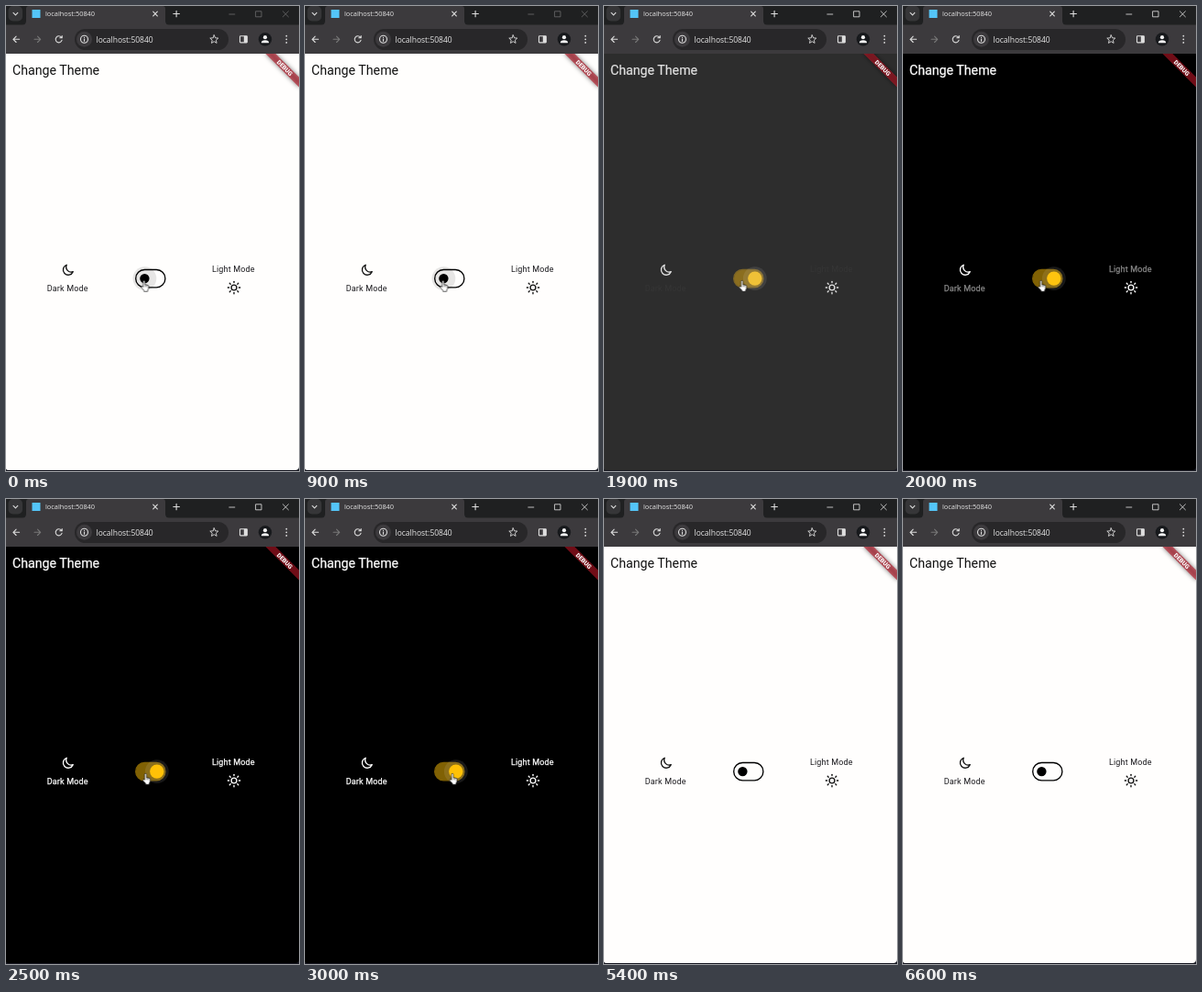
An HTML page for the animation above (6.8 s loop, 320 by 507 pixels).

```html
<!DOCTYPE html>
<html lang="en">
<head>
<meta charset="utf-8">
<title>Change Theme</title>
<style>
  html, body { margin: 0; width: 100%; height: 100%; overflow: hidden; background: #15161f; }

  svg { display: block; width: 100%; height: 100%; animation: theme 6.8s step-end infinite; }

  /* Every colour and the switch state step together */
  @keyframes theme {
    0% {
      --bg: #fffefd; --ink: #111; --label: #1c1b1f; --control: #6c6c6e; --bold: 0px;
      --track: #fffefd; --rim: #000; --thumb: #000; --thumb-x: 151.4px; --thumb-r: 5.2px;
      --halo: #00000018;
    }
    27.94% {
      --bg: #2d2d2d; --ink: #e2e2e2; --label: #353535; --control: #e8e8e8; --bold: .2px;
      --track: #8b6e1f; --rim: #7d6526; --thumb: #efc137; --thumb-x: 164.8px; --thumb-r: 7.7px;
      --halo: #ffffff18;
    }
    29.41% {
      --bg: #000; --ink: #fff; --label: #898989; --control: #e8e8e8; --bold: .25px;
      --track: #806104; --rim: #806104; --thumb: #ffc40f; --thumb-x: 164.8px; --thumb-r: 7.7px;
      --halo: #ffffff18;
    }
    30.88% {
      --bg: #000; --ink: #fff; --label: #d2d2d2; --control: #e8e8e8; --bold: .25px;
      --track: #806104; --rim: #806104; --thumb: #ffc40f; --thumb-x: 164.8px; --thumb-r: 7.7px;
      --halo: #ffffff18;
    }
    32.35% {
      --bg: #000; --ink: #fff; --label: #fff; --control: #e8e8e8; --bold: .25px;
      --track: #806104; --rim: #806104; --thumb: #ffc107; --thumb-x: 164.8px; --thumb-r: 7.7px;
      --halo: #ffffff18;
    }
    64.7% {
      --bg: #fffefd; --ink: #111; --label: #1c1b1f; --control: #e8e8e8; --bold: 0px;
      --track: #fffefd; --rim: #000; --thumb: #000; --thumb-x: 151.4px; --thumb-r: 5.2px;
      --halo: #00000018;
    }
    69.11%, 100% {
      --bg: #fffefd; --ink: #111; --label: #1c1b1f; --control: #e8e8e8; --bold: 0px;
      --track: #fffefd; --rim: #000; --thumb: #000; --thumb-x: 151.4px; --thumb-r: 5.2px;
      --halo: transparent;
    }
  }

  .pointer { animation: move 6.8s step-end infinite; }
  @keyframes move {
    0% { transform: translate(147.5px, 299px); opacity: 1; }
    36.76% { transform: translate(149.2px, 299px); opacity: 1; animation-timing-function: steps(5, end); }
    44.11% { transform: translate(157.7px, 299px); opacity: 1; }
    69.11%, 100% { transform: translate(157.7px, 299px); opacity: 0; }
  }

  .line { fill: none; stroke-linecap: round; stroke-linejoin: round; }
  .toolbar { fill: #3c3a3d; }
  .bar { stroke: #dedede; stroke-width: 1.1; }
  .disabled { stroke: #777; }
  .controls { stroke: var(--control); stroke-width: .8; }
  .icon { stroke: var(--ink); stroke-width: 1.35; }
  .page { fill: var(--bg); }
  .address { font-family: "Open Sans", "Noto Sans", sans-serif; fill: #e6e6e6; }
  .title { font: 14.2px Roboto, sans-serif; fill: var(--ink); stroke: var(--ink); stroke-width: var(--bold); }
  .label {
    font: 9.03px Roboto, sans-serif; letter-spacing: .16px;
    fill: var(--label); stroke: var(--label); stroke-width: var(--bold);
  }
  .debug { font: 900 6.6px Roboto, sans-serif; fill: #fff; text-anchor: middle; }
  .ribbon-shadow { fill: #0000007f; filter: blur(2.4px); }
  .ribbon { fill: #b31626a0; }
  .halo { cx: var(--thumb-x); fill: var(--halo); }
  .track { fill: var(--track); stroke: var(--rim); stroke-width: 1.35; }
  .thumb { cx: var(--thumb-x); r: var(--thumb-r); fill: var(--thumb); }
</style>
</head>
<body>
<svg viewBox="0 0 320 507">
  <defs>
    <clipPath id="content"><path d="M0 52H320V507H0z"/></clipPath>
    <path id="ray" d="M0 -5.4V-6.7"/>
  </defs>

  <!-- Browser tab strip -->
  <rect width="320" height="52" fill="#1f2021"/>
  <rect x="2.5" y="0" width="15.5" height="16.5" rx="5" fill="#363638"/>
  <path class="toolbar" d="M17 21q5 0 5-5V3q0-3 3-3H171q3 0 3 3V16q0 5 5 5z"/>
  <rect x="28.5" y="4" width="9" height="9" fill="#54c5f8"/>
  <text class="address" x="43" y="11.3" font-size="7.4">localhost:50840</text>
  <g class="line bar">
    <path d="M8 7.4l2.4 2.4 2.4-2.4M160.7 6.2l4.6 4.6m0-4.6l-4.6 4.6M182.8 8.5h6.6m-3.3-3.3v6.6"/>
  </g>
  <g class="line controls">
    <path d="M243.8 9h6M273 5.8h6v6h-6zM302.4 5.8l6 6m0-6l-6 6"/>
  </g>

  <!-- Toolbar -->
  <rect class="toolbar" y="20.5" width="320" height="31.5"/>
  <rect x="75" y="25" width="168" height="23" rx="11.5" fill="#282729"/>
  <circle class="toolbar" cx="85.5" cy="36.3" r="8.5"/>
  <g class="line bar">
    <path d="M14.6 36.3H8m3.1-3.2L7.9 36.3l3.2 3.2"/>
    <path class="disabled" d="M31 36.3h6.6m-3.1-3.2l3.2 3.2-3.2 3.2"/>
    <path d="M60.5 34.2a3.5 3.5 0 1 0 .6 3M61.2 32.6v2.2h-2.4"/>
    <circle cx="85.5" cy="36.3" r="4"/>
    <path d="M85.5 36v2.2M85.5 34.3v.1"/>
    <path d="M227.3 31.8l1.3 3 3.2.3-2.4 2.1.7 3.2-2.8-1.7-2.8 1.7.7-3.2-2.4-2.1 3.2-.3z" stroke-width=".9"/>
    <rect x="255.5" y="32.7" width="7.8" height="7.2" rx=".6"/>
  </g>
  <rect x="259.8" y="32.7" width="3.5" height="7.2" fill="#dedede"/>
  <circle cx="283" cy="36.3" r="7.2" fill="#17191c"/>
  <g fill="#f4f4f4">
    <circle cx="283" cy="34.2" r="2.1"/>
    <path d="M278.8 40.2q0-3 4.2-3t4.2 3z"/>
  </g>
  <g fill="#dedede">
    <circle cx="306.3" cy="32.7" r=".9"/>
    <circle cx="306.3" cy="36.3" r=".9"/>
    <circle cx="306.3" cy="39.9" r=".9"/>
  </g>
  <text class="address" x="98.5" y="39.6" font-size="8.5">localhost:50840</text>

  <!-- App page -->
  <path class="page" d="M0 52H320V502q0 4-4 4H3q-3 0-3-2z"/>
  <text class="title" x="7" y="74.6">Change Theme</text>

  <g clip-path="url(#content)">
    <g transform="translate(320 52) rotate(45)">
      <rect class="ribbon-shadow" x="-25.8" y="18.06" width="51.6" height="7.74"/>
      <rect class="ribbon" x="-25.8" y="18.06" width="51.6" height="7.74"/>
      <text class="debug" y="24.3">DEBUG</text>
    </g>
  </g>

  <path class="line icon" d="M66.2 282.3A5.6 5.6 0 1 0 73.2 289.7A5.5 5.5 0 0 1 66.2 282.3z"/>
  <text class="label" x="44.7" y="311.3">Dark Mode</text>

  <text class="label" x="225" y="289.6">Light Mode</text>
  <g class="line icon" transform="translate(249 307)">
    <circle r="2.9"/>
    <use href="#ray"/>
    <use href="#ray" transform="rotate(45)"/>
    <use href="#ray" transform="rotate(90)"/>
    <use href="#ray" transform="rotate(135)"/>
    <use href="#ray" transform="rotate(180)"/>
    <use href="#ray" transform="rotate(225)"/>
    <use href="#ray" transform="rotate(270)"/>
    <use href="#ray" transform="rotate(315)"/>
  </g>

  <rect class="track" x="141.7" y="287.5" width="32.2" height="19.3" rx="9.65"/>
  <circle class="halo" cy="297.1" r="12.9"/>
  <circle class="thumb" cy="297.1"/>

  <g class="pointer">
    <path d="M2.2 1.3a1 1 0 0 1 2 0v3.4l3 .6q1.3.3 1.2 1.6l-.4 2.7-.8 1.4v1.3h-4v-1.2L.5 8.2q-.7-1 .2-1.5.7-.3 1.5.7z" fill="#fff" stroke="#000" stroke-width=".6"/>
    <path class="line" d="M4.2 5v2M5.6 5.2v1.8M7 5.5v1.6" stroke="#000" stroke-width=".35"/>
  </g>
</svg>
</body>
</html>
```
